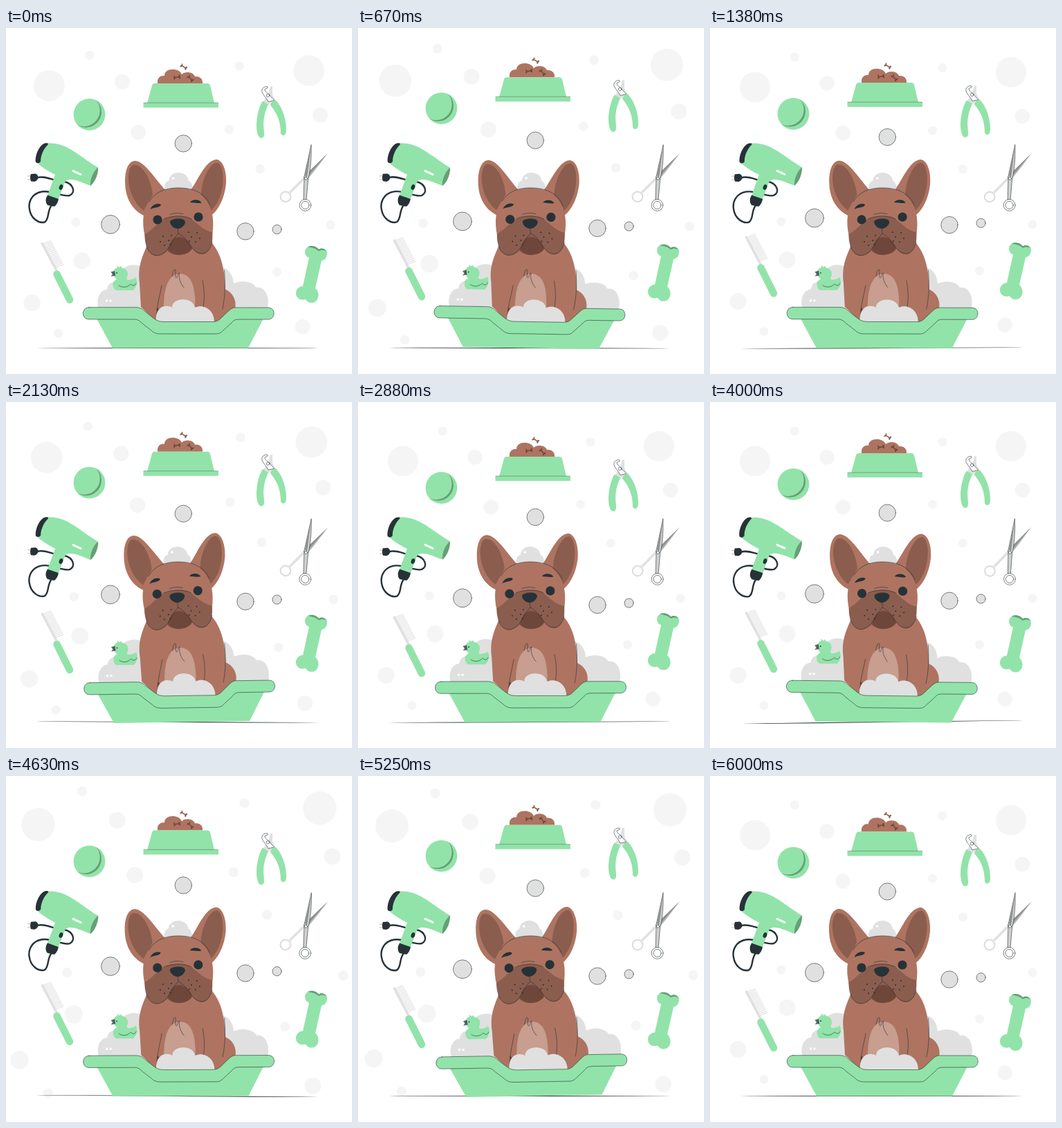
Animation, 500 px wide and 500 px high, one loop 6040 ms. Source, as an HTML page:

```html
<!DOCTYPE html>
<html lang="en">
<head>
<meta charset="utf-8">
<title>Dog bath</title>
<style>
  html, body { margin: 0; width: 100%; height: 100%; overflow: hidden; background: #fff; }
  svg { display: block; width: 100vw; height: 100vh; }
  .green { fill: #92e3a9; }
  .shade { fill: #669f76; }
  .brown { fill: #ae7461; }
  .cocoa { fill: #8b5d4e; }
  .deep { fill: #6f473a; }
  .dark { fill: #263238; }
  .foam { fill: #e0e0e0; }
  .white { fill: #fff; }
  .ink { stroke: #263238; stroke-width: .6; stroke-linecap: round; stroke-linejoin: round; }
  .line { fill: none; }
  .spots { fill: none; stroke-linecap: round; }
</style>
</head>
<body>
<svg viewBox="0 0 500 500">
  <defs>
    <path id="treat" d="M-4-.8C-6.500-3.500-2.500-3.500-2.500-.8H2.500C2.500-3.500 6.500-3.500 4.500 0C6.500 3.500 2.500 3.500 2.500 .8H-2.500C-2.500 3.500-6.500 3.500-4.500 0Z"/>
  </defs>

  <g id="dots" class="spots" stroke="#f5f5f5">
    <path stroke-width="44" d="M65 85.500h0M435 64h0"/>
    <path stroke-width="24" d="M111.500 335h0M40.500 395h0"/>
    <path stroke-width="21.500" d="M169 80h0M192 152h0M451.500 127.500h0M426 429h0"/>
    <path stroke-width="13" d="M122.500 42h0M103 280h0M78 438.500h0M336 57.500h0M321.500 148h0M365.500 204h0M466 284h0M389.500 351h0"/>
  </g>
  <path id="ground" class="dark" d="M452 462.500Q440 462.950 248 462.950T44 462.500Q60 462.050 248 462.050T452 462.500Z"/>

  <g id="bowl"><g transform="translate(0 .4)">
    <path class="brown" d="M219 80C218 72 223 68 229 69C229 57 250 57 254 67C258 62 271 63 273 70C280 69 285 74 284 80Z"/>
    <use href="#treat" class="deep" transform="translate(247 71) rotate(-8)"/>
    <use href="#treat" class="deep" transform="translate(266.500 73) rotate(48)"/>
    <use href="#treat" class="cocoa" transform="translate(256.800 56) rotate(32)"/>
    <path class="green" d="M214 80H291Q294 80 295 83L301 108.500H204L211 83Q212 80 214 80ZM198.500 108H307V115H198.500Z"/>
    <path class="ink line" style="stroke-width:.35" d="M199 108H306.500"/>
  </g></g>

  <g id="ball">
    <circle class="green" cx="120.500" cy="125.300" r="22.900"/>
    <path class="shade" d="M130 104.500A22.900 22.900 0 0 1 103.500 140.500A22.400 22.400 0 0 0 130 104.500Z"/>
  </g>

  <g id="clipper"><g transform="translate(0 .8)">
    <path class="foam" d="M382 84H385V96L389 104L380 110L377 104ZM372 106L377 96L384 103L379 111Z"/>
    <path class="white ink" d="M377 84C371 84 368 89 371 94C373 98 377 101 379 106L388 104C385 101 382 99 381 96C378 93 374 92 374 88L378 86Z"/>
    <circle class="white ink" cx="378.500" cy="97" r="2.200"/>
    <path class="green" d="M371 105L379 110C375 119 371 130 372.500 145C373 151 374 156 371 158C367 160 364 156 363 150C360 135 365 113 371 105Z"/>
    <path class="green" d="M382 111C382 108 387 103 390 104C400 115 405 132 405 147C405 155 400 157 397 152C397 136 393 124 382 111Z"/>
  </g></g>

  <g id="dryer">
    <path fill="none" stroke="#263238" stroke-width="2.400" stroke-linecap="round" d="M45 216C60 213 68 222 84 222C98 225 101 238 92 242C82 245 67 234 52 236.500C37 239 32 252 34 262C36 275 47 283 56 280.500C63 276 59 265 66 256"/>
    <path class="dark" d="M36 211L43 210.500Q47 213 46.500 217Q45 221 41 222L36 221.500Q34 216 36 211Z"/>
    <path stroke="#c7c7c7" stroke-width="1.200" d="M31 214H35M31 219H35"/>
    <path class="green" d="M58 167C86 163 106 186 133 201.500L122 228C105 221 94 216 86 221L76 247L60 242L71 212C61 207 53 202 45 195C44 184 50 170 58 167Z"/>
    <path class="dark" d="M60 166.500C50 164 41 184 43 194Q47 197 50 193C50 184 54 175 61 168Z"/>
    <path class="shade" d="M133 201.500C134 209 129 223 122 228C121 219 126 207 133 201.500Z"/>
    <path stroke="#fff" stroke-width="3" stroke-linecap="round" d="M97 206.500L108 211.500"/>
    <ellipse class="dark" cx="79.500" cy="230" rx="2.700" ry="4" transform="rotate(20 79.500 230)"/>
    <path class="dark" d="M60 241.500L76 247Q75 254 70 258L60 256Q55 250 60 241.500Z"/>
  </g>

  <g id="comb"><g transform="translate(.5 .8)">
    <path id="teeth" stroke="#d6d6d6" stroke-width=".9"/>
    <path stroke="#e0e0e0" stroke-width="3.500" stroke-linecap="round" d="M52 311L73 351"/>
    <path stroke="#92e3a9" stroke-width="10.500" stroke-linecap="round" d="M73 355L91.500 392"/>
  </g></g>

  <g id="scissors">
    <path fill="#b5b5b5" d="M465 181C455 194 444 210 434 220L429 216Z"/>
    <path fill="#8f8f8f" d="M464.500 181.500L437 208L434 217Z"/>
    <path fill="none" stroke="#e0e0e0" stroke-width="3.500" d="M431 217L410 238"/>
    <circle fill="none" stroke="#dedede" stroke-width="2.200" cx="404" cy="244" r="7.300"/>
    <path class="ink" fill="#d0d0d0" d="M441 169C441.500 188 440 206 436.500 220L434 248H430L431 215Z"/>
    <path fill="#8f8f8f" d="M441 170L432 213L435 216Z"/>
    <circle class="white ink" cx="432.500" cy="256" r="8.400"/>
    <circle class="ink" fill="#fff" cx="432.500" cy="256" r="5.600"/>
    <circle class="white ink" cx="433.500" cy="217.500" r="2"/>
  </g>

  <g id="bone">
    <path class="green" d="M438 332C431 330 430 320 436 316.500C442 313 449 316 452 320C460 316 466 322 463.500 329C462 334 459 336 456 336L447 376C453 381 453 391 447 395.500C441 399 435 396 433 392C425 395 418 389 419 382C420 376 425 373 429 373Z"/>
    <path class="shade" d="M436 316.500C442 313 449 316 452 320C456 317 461 319 463 323C458 320 455 321 452 322.500C447 318 441 317 436 316.500Z"/>
  </g>

  <g id="bubbles" class="foam ink">
    <circle cx="256.300" cy="167" r="12.200"/>
    <circle cx="151" cy="284" r="13.400"/>
    <circle cx="346" cy="294" r="12.200"/>
    <circle cx="391.600" cy="291.200" r="6.600"/>
  </g>

  <g id="dog">
    <path class="foam" d="M229 236C228 224 232 221 235 221C236 205 262 205 264 221C268 222 270 228 269 236Z"/>
    <path class="foam" d="M134 406C129 390 137 378 146 378C147 369 154 366 161 367C161 336 204 334 207 362V406Z"/>
    <path class="foam" d="M300 346C316 342 328 352 329 369C343 363 359 368 361 375C373 373 382 386 378 406H300Z"/>
    <path class="spots" stroke="#fff" stroke-width="3.600" d="M241.500 217h0M145.500 394h0M151 394h0"/>
    <path class="brown" d="M312 376C326 379 334 392 331 406L312 424H290Z"/>
    <path class="brown" d="M204 314C193 338 191 350 193 368L195 403L217 425H303C313 418 319 398 317 378C316 350 312 327 297 310Z"/>
    <path class="deep" d="M218 404L229 412L222 425H216Z"/>
    <path fill="#c79e8f" d="M228 412C227 376 234 356 251 355C268 355 275 374 273 410Z"/>
    <path class="ink line" d="M225 372C222 388 219 398 218.500 408M284 365C287 380 287 393 285 404M315.500 350C317 370 317 385 313 406M240 359C241 354 242 349 244 349C247 349 243 361 246 361C248 361 248 354 250.500 354C249 363 253 370 257 375"/>
    <path class="brown" d="M199 271C181 262 172 244 172 222C172 202 178 192 187 192C200 193 214 216 230 234Z"/>
    <path class="cocoa" d="M183 198C173 204 173 244 199 264L212 241C210 221 198 195 183 198Z"/>
    <path class="brown" d="M267 234C277 221 288 191 304 190C314 191 319 208 318 224C316 247 306 265 295 272Z"/>
    <path class="cocoa" d="M307 195C295 191 281 222 282 243L296 264C316 247 318 204 307 195Z"/>
    <path class="brown" d="M201 302C190 256 213 231 249 231C286 231 305 258 298 300L270 322H225Z"/>
    <path class="ink line" d="M207 251C215 237 230 231 249 231C272 231 288 239 295 256"/>
    <path class="cocoa" d="M200.500 298C209 294 218 283 227 277C239 270 259 270 268 276C277 283 286 293 298 295C300 312 294 326 284 327C276 327 272 322 268 317C260 330 243 331 233 322C228 327 222 330 215 329C205 326 200 312 200.500 298Z"/>
    <path class="deep" d="M234 321C237 308 242 302 250 302C259 302 266 309 269 319C262 330 242 331 234 321Z"/>
    <path class="ink line" d="M248 288L249 297C240 305 237 321 225 327C215 332 206 326 203 315M249 297C259 300 264 314 273 322C284 331 295 324 298 309M228 276C239 271 258 270 268 276M237 269.500Q246 266 256 268.500"/>
    <path class="dark" d="M237 280C238 275 258 273 259 280C259 285 253 290 248 290C243 290 237 285 237 280Z"/>
    <path class="spots" stroke="#263238" stroke-width="13.200" d="M219 277h0M278 273h0"/>
    <path class="dark" d="M208.500 262C211 255 220 252 224 255.500C222 260 214 259 208.500 262ZM266 252C269 247 279 247 282.500 252.500C278 254 271 252 266 252Z"/>
    <path id="freckles" class="spots" stroke="#263238" stroke-width="2" d="M227 301h0M223 309h0M235 307h0M239 300h0M229 314h0M238 313h0"/>
    <use href="#freckles" transform="translate(503 -5) scale(-1 1)"/>
    <path class="green" d="M155 373C153 367 157 365 160 363C156 360 153 353 157 349C159 346 161 347 161 346L160 343L164 346L166 344L168 347C174 347 178 354 175 360C173 364 177 365 182 363Q187 362 187 360Q190 364 189 370Q188 375 184 379H159Q155 377 155 373Z"/>
    <path class="dark" d="M157 351L151.500 352.500L154 356L151.500 359L158 358Z" opacity=".75"/>
    <circle class="dark" cx="160" cy="354" r=".9"/>
    <path class="ink line" d="M163 372C168 376 176 375 180 370C184 374 187 372 188 369"/>
    <path class="foam" d="M217 426C215 412 222 400 234 402Q238 402 240 404C240 389 270 388 273 404C286 398 302 408 301 426Z"/>
    <path class="green" d="M131 420H190L215 435H310L330 420H372L350 462.500H154Z"/>
    <path class="green ink" d="M120 403.700H188C194 404 197 406 200 409L214 420C218 423 222 424.500 228 424.500H298C304 424.500 307 423 311 419L322 408.500C326 405 328 404 332 404H379C390 404 390 421 379 421H337C332 421 329 422 326 426L314 437C310 441 308 442 302 442H224C218 442 214 441 210 437L197 427C192 422 190 421 184 421H120C108.500 421 108.500 403.700 120 403.700Z"/>
  </g>
</svg>
<script>
const LOOP = 6040, SPAN = 6000, LEAD = 20;
const get = id => document.getElementById(id);
const move = (id, transform) => get(id).setAttribute("transform", transform);

let teeth = "";
for (let i = 0; i < 17; i++) teeth += `M${52 + i * 1.12} ${311.5 + i * 2.15}l13 -5`;
get("teeth").setAttribute("d", teeth);

// Waves over one period, with p from 0 to 1
const triangle = p => 1 - Math.abs(2 * (p % 1) - 1);
const float = p => -10 * triangle(p);
const sway = p => 2 * triangle(p + .25) - 1;
const tent = (p, peak, fall) => p < peak ? 1 - (peak - p) / .1 : 1 - (p - peak) / fall;
const beat = p => 1 + .1 * Math.max(0, tent(p, .1, .2), tent(p, .5, .1));

function draw(now) {
  const t = Math.min(now % LOOP + LEAD, SPAN);
  const phase = period => t % period / period;
  const bob = (id, period) => move(id, `translate(0 ${float(phase(period))})`);
  const rock = (id, period, x, y) => move(id, `rotate(${sway(phase(period))} ${x} ${y})`);

  for (const id of ["bowl", "ball", "clipper"]) bob(id, 1500);
  for (const id of ["comb", "bubbles"]) bob(id, 3000);
  bob("bone", 6000);

  rock("dryer", 1500, 82, 224);
  rock("scissors", 1500, 430.5, 217);
  rock("ground", 1500, 248, 462.5);
  rock("dog", 3000, 250, 326);

  move("dots", `translate(250 240) scale(${beat(phase(1500))}) translate(-250 -240)`);
}

const start = performance.now();
function tick() {
  draw(performance.now() - start);
  requestAnimationFrame(tick);
}
tick();
</script>
</body>
</html>
```
